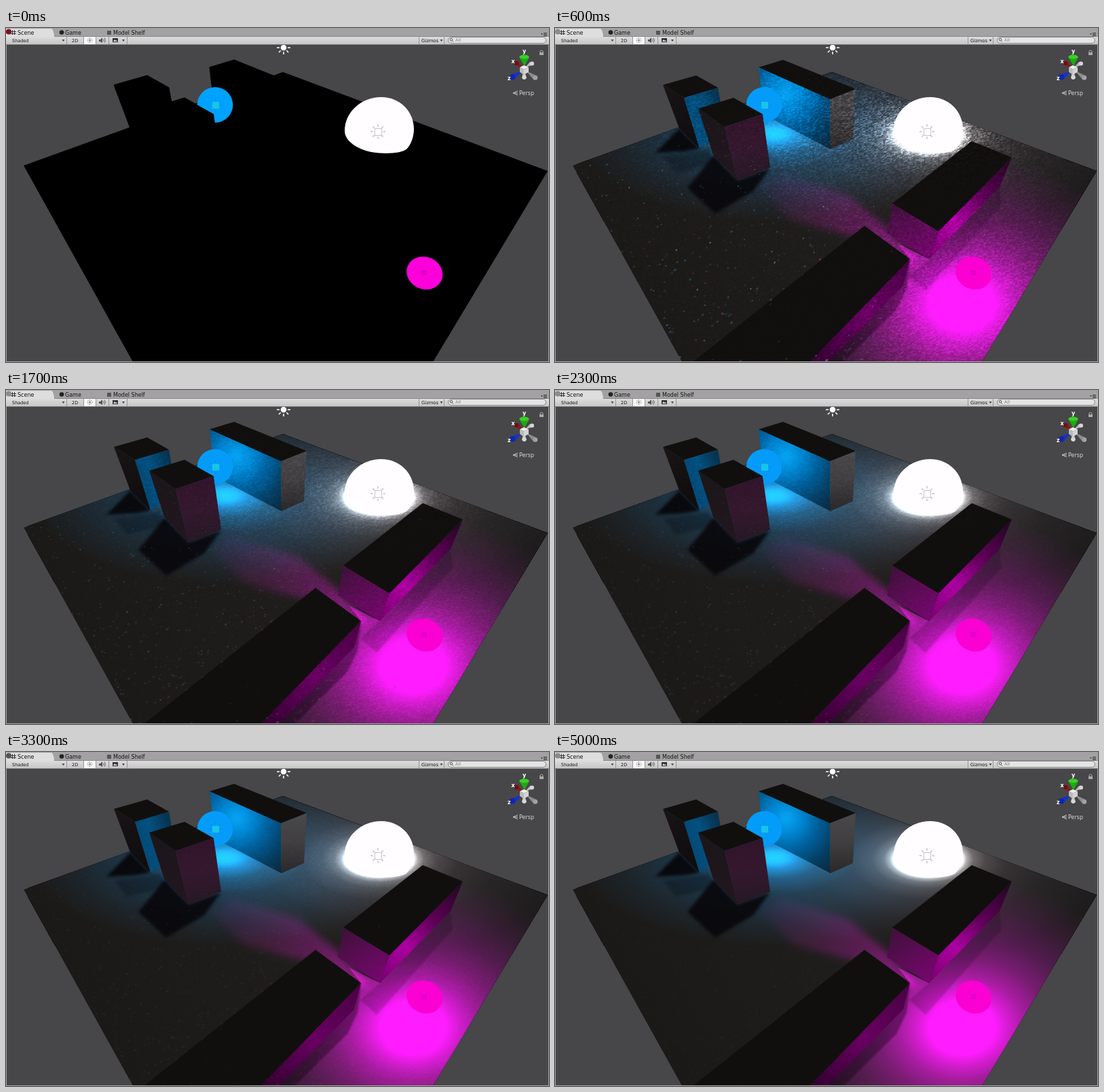
These frames come from a looping animation (800x493 px, 5500 ms). An HTML page with a canvas:

```html
<!DOCTYPE html>
<html lang="en">
<head>
<meta charset="utf-8">
<title>Progressive lighting</title>
<style>
html, body { margin: 0; width: 100%; height: 100%; overflow: hidden; background: #474648; }
canvas { display: block; }
</style>
</head>
<body>
<canvas id="stage" width="800" height="493"></canvas>
<script>
const W = 800, H = 493, LOOP = 5500;
const STEPS = [0, 500, 600, 900, 1000, 1500, 1700, 2100, 2300, 2800, 3000, 3300, 3600, 3800, 4200, 4500, 4700, 5000];
const FONT = '"DejaVu Sans", Verdana, sans-serif';
const view = document.getElementById('stage').getContext('2d');

function layer() {
  const c = document.createElement('canvas');
  c.width = W;
  c.height = H;
  return c.getContext('2d', { willReadFrequently: true });
}

function random(seed) {
  return () => {
    seed = seed + 0x6D2B79F5 | 0;
    let t = Math.imul(seed ^ seed >>> 15, 1 | seed);
    t = t + Math.imul(t ^ t >>> 7, 61 | t) ^ t;
    return ((t ^ t >>> 14) >>> 0) / 4294967296;
  };
}

const poly = points => new Path2D('M' + points + 'Z');

const floor = poly('26 203L408 65L798 211L629 493L187 493');
const boxA = {
  top: poly('159 84L208 70L240 88L190 103'),
  left: poly('159 84L190 103L213 178L183 148'),
  right: poly('190 103L240 88L251 150L213 178')
};
const boxB = {
  top: poly('211 119L263 103L306 127L250 146'),
  left: poly('211 119L250 146L269 225L233 187'),
  right: poly('250 146L306 127L317 206L269 225')
};
const boxC = {
  top: poly('300 58L336 47L443 90L405 105'),
  left: poly('300 58L405 105L406 179L308 128'),
  right: poly('405 105L443 90L439 164L406 179')
};
const boxD = {
  top: poly('497 259L614 167L673 191L565 300'),
  left: poly('497 259L565 300L551 341L489 303'),
  right: poly('565 300L673 191L655 235L551 341')
};
const boxE = {
  top: poly('203 493L456 292L523 341L375 493'),
  right: poly('523 341L513 380L402 493L375 493')
};
const boxes = [boxA, boxC, boxB, boxD, boxE];
const dome = new Path2D('M499 152C499 124.5 523 102 553 102C580 102 601 123 601 149C601 160 597 172 590 179C580 187 540 187 522 178C507 171 499 162 499 152Z');

function addStops(g, stops) {
  for (const [at, rgb] of stops) g.addColorStop(at, `rgb(${rgb})`);
  return g;
}

function glow(c, x, y, rx, ry, stops) {
  c.save();
  c.globalCompositeOperation = 'lighter';
  c.translate(x, y);
  c.scale(rx, ry);
  c.fillStyle = addStops(c.createRadialGradient(0, 0, 0, 0, 0, 1), stops);
  c.fillRect(-1, -1, 2, 2);
  c.restore();
}

function shade(c, path, x0, y0, x1, y1, ...colors) {
  const stops = colors.map((rgb, i) => [i / (colors.length - 1), rgb]);
  c.fillStyle = addStops(c.createLinearGradient(x0, y0, x1, y1), stops);
  c.fill(path);
}

function soft(c, blur, color, points) {
  c.filter = `blur(${blur}px)`;
  c.fillStyle = color;
  c.fill(poly(points));
  c.filter = 'none';
}

// The converged lighting, transparent outside the model
function paintLit() {
  const c = layer();
  c.save();
  c.clip(floor);
  shade(c, floor, 100, 400, 640, 100, '27,25,23', '31,29,28', '30,28,28');
  glow(c, 550, 158, 270, 140, [[0, '235,235,235'], [.19, '230,230,230'], [.21, '145,144,145'],
    [.245, '82,80,82'], [.31, '47,45,47'], [.43, '24,22,24'], [.65, '10,9,10'], [1, '0,0,0']]);
  glow(c, 322, 156, 290, 130, [[0, '0,180,250'], [.06, '0,165,240'], [.13, '0,112,180'],
    [.24, '0,62,102'], [.42, '0,30,50'], [.75, '0,11,19'], [1, '0,0,0']]);

  c.save();
  c.clip(poly('375 493L523 341L505 318L551 341L655 235L673 191L800 195L800 493'));
  glow(c, 600, 407, 270, 222, [[0, '232,0,232'], [.17, '230,0,232'], [.25, '182,0,180'],
    [.34, '136,0,132'], [.46, '92,0,88'], [.62, '52,0,50'], [.82, '20,0,19'], [1, '0,0,0']]);
  c.restore();

  c.save();
  c.globalCompositeOperation = 'lighter';
  c.filter = 'blur(6px)';
  shade(c, poly('535 346L490 296L430 246L330 215L305 238L350 284L440 308L510 342'),
    520, 338, 305, 222, '112,0,105', '58,0,53', '28,2,25', '8,0,7');
  c.restore();

  soft(c, 2, 'rgba(6,4,6,.88)', '148 184L183 148L213 178L190 182');
  soft(c, 2, 'rgba(6,8,14,.3)', '160 190L226 180L240 200L178 213');
  soft(c, 2, 'rgba(9,6,10,.88)', '195 236L234 188L269 225L317 207L292 241L236 274');
  soft(c, 1, 'rgba(10,0,12,.36)', '523 341L518 385L503 416L425 493L375 493');
  soft(c, 1, 'rgba(10,0,12,.18)', '655 235L658 262L546 388L522 366L551 341');
  c.restore();

  shade(c, boxA.left, 165, 90, 205, 170, '24,20,22', '15,12,14');
  shade(c, boxA.right, 195, 140, 246, 120, '4,72,116', '3,80,128', '6,52,82');

  c.fillStyle = addStops(c.createRadialGradient(340, 98, 4, 340, 98, 100), [[0, '5,160,240'],
    [.2, '0,134,210'], [.45, '0,96,156'], [.75, '5,62,98'], [1, '12,42,64']]);
  c.fill(boxC.left);
  shade(c, boxC.right, 424, 95, 424, 172, '72,71,73', '64,62,64', '46,43,45');
  shade(c, boxB.left, 225, 130, 262, 215, '27,22,25', '34,22,31');
  shade(c, boxB.right, 278, 136, 292, 215, '50,20,43', '52,24,46', '40,24,37');
  shade(c, boxD.left, 500, 265, 552, 338, '66,16,61', '92,12,85', '118,6,110');
  shade(c, boxD.right, 552, 332, 668, 205, '125,0,116', '172,0,160', '94,0,87', '42,6,40');
  shade(c, boxE.right, 520, 350, 385, 493, '74,2,69', '104,0,97', '52,0,48');
  for (const b of boxes) {
    c.fillStyle = '#110f0e';
    c.fill(b.top);
    // The nearer box covers part of this top
    if (b === boxA) c.fillStyle = '#12100f';
  }
  return c;
}

const lit = paintLit();

const rnd = random(71);
const fireflies = [];
while (fireflies.length < 1200) {
  const x = 26 + rnd() * 772, y = 75 + rnd() * 418;
  const born = fireflies.length < 420 ? 1 : 2 + Math.floor(rnd() ** 2 * 9);
  const onTop = boxes.some(b => lit.isPointInPath(b.top, x, y));
  const far = x > 480 || x > 400 && y < 190;
  if (rnd() < (onTop || far ? .93 : 0)) continue;
  const pink = x > 480 || rnd() < (x < 200 ? .03 : x < 330 ? .16 : .45);
  fireflies.push({
    x, y, born,
    size: (.3 + y / 480) * (.5 + rnd() * .8),
    tilt: -.8 + rnd() * .5,
    power: .2 + rnd() ** 2 * .7,
    color: pink ? '175,40,160' : rnd() < .15 ? '150,165,175' : '45,120,170'
  });
}

const noiseLevel = t => t <= 500 ? 1 : .62 * Math.exp(-(t - 600) / 1600);

// One accumulation step: grain proportional to the light, plus fading fireflies
function paintStep(step) {
  const amp = noiseLevel(STEPS[step]);
  const c = layer();
  const img = lit.getImageData(0, 0, W, H), d = img.data;
  const grain = Float32Array.from({ length: W * H }, random(900 + step));
  for (let y = 24; y < H; y++) {
    for (let x = 0; x < W; x++) {
      const p = y * W + x, i = p * 4;
      if (!d[i + 3]) continue;
      const blob = grain[(y >> 1) * W + Math.floor((x + y % 2) / 2.6)];
      const n = blob * 1.4 + grain[p] * .6 - 1;
      const dx = (x - 550) / 150, dy = (y - 140) / 65;
      const white = Math.exp(-dx * dx - dy * dy);
      const bright = Math.max(d[i], d[i + 1], d[i + 2]) / 255;
      const k = amp * (1.1 * bright * (1 - bright) + 1.2 * white * amp * (1 - .5 * bright));
      const f = Math.max(.08, 1 + k * (n + Math.max(n, 0) ** 2));
      d[i] *= f;
      d[i + 1] *= f;
      d[i + 2] *= f;
    }
  }
  c.putImageData(img, 0, 0);
  c.globalCompositeOperation = 'source-atop';
  for (const s of fireflies) {
    if (s.born > step) continue;
    c.fillStyle = `rgba(${s.color},${Math.min(1, s.power * amp * 1.2)})`;
    c.beginPath();
    c.ellipse(s.x, s.y, s.size * 1.5, s.size, s.tilt, 0, 7);
    c.fill();
  }
  return c.canvas;
}

function paintDark() {
  const c = layer();
  c.fillStyle = c.strokeStyle = '#000';
  c.fill(floor);
  for (const face of boxes.flatMap(b => Object.values(b))) {
    c.fill(face);
    c.stroke(face);
  }
  return c.canvas;
}

function rays(c, x, y, from, to, color, width) {
  c.strokeStyle = color;
  c.lineWidth = width;
  c.beginPath();
  for (let a = 0; a < 8; a++) {
    const u = Math.cos(a * Math.PI / 4), v = Math.sin(a * Math.PI / 4);
    c.moveTo(x + u * from, y + v * from);
    c.lineTo(x + u * to, y + v * to);
  }
  c.stroke();
}

function disc(c, x, y, r, color) {
  c.fillStyle = color;
  c.beginPath();
  c.arc(x, y, r, 0, 7);
  c.fill();
}

function rect(c, color, x, y, w, h) {
  c.fillStyle = color;
  c.fillRect(x, y, w, h);
}

function shape(c, color, points) {
  c.fillStyle = color;
  c.fill(poly(points));
}

function label(c, str, x, y, size, color = '#151515', weight = '') {
  c.font = `${weight} ${size}px ${FONT}`;
  c.fillStyle = color;
  c.fillText(str, x, y);
}

function paintLamps(c, dark) {
  c.save();
  const mask = new Path2D();
  mask.rect(0, 0, W, H);
  mask.addPath(poly('211 119L263 103L306 127L317 206L269 225L233 187'));
  c.clip(mask, 'evenodd');
  disc(c, 308, 113.5, 26.3, dark ? '#00a2ff' : '#049cf8');
  c.restore();
  rays(c, 308.5, 114, 7, 10, 'rgba(0,125,195,.45)', 1);
  rect(c, '#18c4e8', 304, 109, 10, 10);

  c.fillStyle = '#fffdff';
  c.fill(dome);
  rays(c, 548, 153, 7.5, 11, '#d2d0d2', 2);
  c.lineWidth = 1;
  c.strokeStyle = '#c8c6c8';
  c.strokeRect(543.5, 148.5, 10, 10);

  c.fillStyle = dark ? '#fc00dc' : '#fb00d2';
  c.beginPath();
  c.ellipse(616.8, 361.7, 27, 23.8, .4, 0, 7);
  c.fill();
  rays(c, 616, 361, 7, 10, 'rgba(222,0,192,.35)', 1);
  rect(c, '#e400c8', 612, 357, 8, 8);
}

function paintAxes(c) {
  shape(c, '#b9b9b9', '765 58L772 50L778 54');
  disc(c, 775, 52.5, 3, '#d6d6d6');
  shape(c, '#8c8c8c', '766 63L783 71L778 77');
  disc(c, 780, 73.5, 3.2, '#a2a2a2');
  shape(c, '#8e1616', '762 60L749 54L754 48');
  disc(c, 752, 52, 3, '#701010');
  shape(c, '#1733c4', '761 63L743 69L748 77');
  disc(c, 746, 72.5, 4, '#1026ac');
  shape(c, '#c6c6c6', '763 60L760 74L767 74');
  disc(c, 763.5, 73, 3, '#d8d8d8');
  shape(c, '#22a814', '756 43L771 43L764 56');
  c.fillStyle = '#35d322';
  c.beginPath();
  c.ellipse(763.5, 42.5, 7, 3, 0, 0, 7);
  c.fill();
  shape(c, '#ededed', '757 58L763 55L770 58L763 61');
  shape(c, '#bcbcbc', '757 58L763 61L763 69L757 65');
  shape(c, '#d4d4d4', '763 61L770 58L770 65L763 69');
  label(c, 'y', 761, 37, 8, '#fff', 'bold');
  label(c, 'x', 744.5, 52, 8, '#fff', 'bold');
  label(c, 'z', 739, 77, 8, '#fff', 'bold');
  label(c, 'Persp', 756, 99, 8, '#d6d6d6');
  c.strokeStyle = '#c8c8c8';
  c.lineWidth = 1;
  c.stroke(new Path2D('M754 93L747 96L754 99M747 96H754'));
  rect(c, '#a8a8a8', 786, 36, 6, 4);
  c.strokeStyle = '#a8a8a8';
  c.stroke(new Path2D('M787 36V34Q789 32 791 34V36'));
}

function paintChrome() {
  const c = layer();
  rays(c, 409, 29, 6, 10, '#fff', 1.5);
  disc(c, 409, 29, 4.3, '#fff');
  paintAxes(c);

  rect(c, '#a3a1a3', 0, 0, W, 12);
  shape(c, '#dedede', '0 1L67 1Q70 2 71 12L0 12');
  shade(c, poly('0 12L800 12L800 24L0 24'), 0, 12, 0, 24, '222,222,222', '198,198,198');
  rect(c, '#8b8a8b', 71, 12, 729, 1);
  rect(c, '#777677', 0, 24, W, 1);
  rect(c, '#a3a1a3', 0, 25, 1, H);
  rect(c, '#a3a1a3', 799, 25, 1, H);
  rect(c, '#a3a1a3', 0, 492, W, 1);

  rect(c, '#fafafa', 114, 13, 18, 11);
  for (const x of [89, 114, 132, 151, 178, 608, 645]) rect(c, '#989798', x, 13, 1, 11);

  c.strokeStyle = '#333';
  c.lineWidth = 1;
  c.stroke(new Path2D('M9.5 3V10M12.5 3V10M7 5.5H15M7 8.5H15'));
  disc(c, 82, 6.5, 3.3, '#222');
  rect(c, '#555', 149, 4, 6, 6);
  label(c, 'Scene', 17, 9.6, 8);
  label(c, 'Game', 87, 9.6, 8);
  label(c, 'Model Shelf', 158, 9.6, 8);

  label(c, 'Shaded', 9, 20.6, 6.5);
  label(c, '2D', 97, 20.6, 6.5);
  label(c, 'Gizmos', 612, 20.6, 6.8);
  for (const x of [84.5, 173, 641.5]) shape(c, '#444', `${x - 2} 17L${x + 2} 17L${x} 20`);
  rays(c, 123.5, 18, 2.5, 4, '#777', 1);
  disc(c, 123.5, 18, 1.5, '#888');
  shape(c, '#555', '137 17L139 17L142 14L142 22L139 20L137 20');
  c.strokeStyle = '#666';
  c.stroke(new Path2D('M143.5 16Q145 18 143.5 20M145 14.5Q148 18 145 21.5'));
  rect(c, '#333', 157, 15, 8, 6);
  shape(c, '#ddd', '158 20L160 17L162 19L163 18L164 20');

  c.fillStyle = '#e4e4e4';
  c.strokeStyle = '#858585';
  c.beginPath();
  c.roundRect(651.5, 13.5, 144, 9, 4.5);
  c.fill();
  c.stroke();
  c.strokeStyle = '#555';
  c.beginPath();
  c.arc(656, 17.2, 1.8, 0, 7);
  c.moveTo(657.3, 18.5);
  c.lineTo(659, 20.5);
  c.stroke();
  label(c, 'All', 662, 20.4, 6.5, '#858585');
  shape(c, '#333', '788 8L791 8L789.5 10');
  for (const y of [7, 9, 11]) rect(c, '#333', 792, y, 5, 1);
  return c.canvas;
}

const chrome = paintChrome();
const cache = [];

function markerColor(step) {
  if (step === 0) return '#7c1414';
  if (step === 3 || step === 4) return '#1298dc';
  return step === 11 || step === 14 ? '#565456' : '#8c8a8c';
}

function paintScene(step) {
  const c = layer();
  rect(c, '#474648', 0, 0, W, H);
  c.drawImage(step ? paintStep(step) : paintDark(), 0, 0);
  paintLamps(c, step === 0);
  c.drawImage(chrome, 0, 0);
  disc(c, 4, 5.5, 4, markerColor(step));
  return c.canvas;
}

let start = null, shown = -1;

function tick(now) {
  if (start === null) start = now;
  const t = (now - start) % LOOP;
  const step = STEPS.findLastIndex(at => at <= t);
  if (step !== shown) {
    view.drawImage(cache[step], 0, 0);
    shown = step;
  }
  requestAnimationFrame(tick);
}

STEPS.forEach((_, i) => cache.push(paintScene(i)));
view.drawImage(cache[0], 0, 0);
requestAnimationFrame(tick);
</script>
</body>
</html>
```
